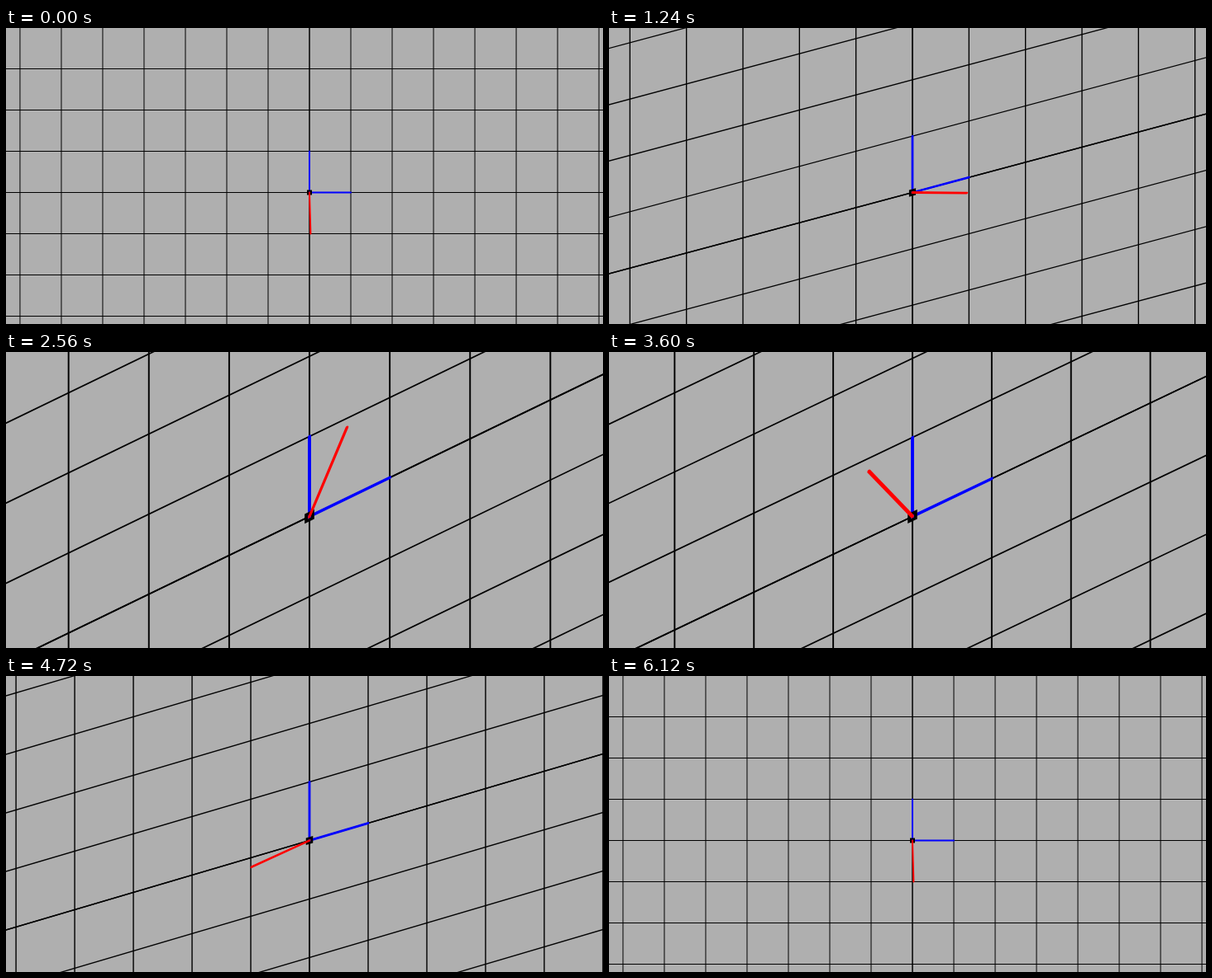
Write an HTML page with a canvas that moves like this. It is 722 by 359 pixels and loops after 6.2 s.

```html
<!DOCTYPE html>
<html lang="en">
<head>
<meta charset="utf-8">
<title>Shear and scale of a basis</title>
<style>
  html, body { margin: 0; width: 100%; height: 100%; overflow: hidden; background: #afafaf; }
  canvas { display: block; width: 722px; height: 359px; }
</style>
</head>
<body>
<canvas id="stage" width="722" height="359"></canvas>
<script>
const ctx = document.getElementById('stage').getContext('2d');
const LOOP = 6200, TURN = 6120, TICK = 40;
const START = 1.6 * Math.PI / 180;
const ORIGIN = { x: 367, y: 199.5 };
const UNIT = 50, REACH = 20;

function line(x1, y1, x2, y2) {
  ctx.beginPath();
  ctx.moveTo(x1, y1);
  ctx.lineTo(x2, y2);
  ctx.stroke();
}

function drawGrid() {
  const end = REACH * UNIT;
  ctx.strokeStyle = '#000';
  ctx.lineWidth = 1;
  ctx.lineCap = 'butt';
  for (let i = -REACH; i <= REACH; i++) {
    const p = i * UNIT;
    line(p, -end, p, end);
    line(-end, p, end, p);
  }
  // a second pass darkens the two axes
  line(0, -end, 0, end);
  line(-end, 0, end, 0);
}

function drawVector(x, y, color) {
  ctx.strokeStyle = color;
  ctx.lineWidth = 2;
  ctx.lineCap = 'round';
  line(0, 0, x * UNIT, y * UNIT);
}

function drawOrigin() {
  ctx.strokeStyle = '#000';
  ctx.lineWidth = 2;
  ctx.strokeRect(-2, -2, 4, 4);
}

function draw(time) {
  const t = Math.min(Math.floor((time % LOOP) / TICK) * TICK, TURN);
  const angle = START + 2 * Math.PI * t / TURN;
  const scale = 1.5 - 0.5 * Math.cos(angle);

  ctx.setTransform(1, 0, 0, 1, 0, 0);
  ctx.fillStyle = '#afafaf';
  ctx.fillRect(0, 0, 722, 359);

  // the matrix also shapes the stroke widths
  ctx.setTransform(scale, 1 - scale, 0, scale, ORIGIN.x, ORIGIN.y);
  drawGrid();
  drawVector(1, 0, '#00f');
  drawVector(0, -1, '#00f');
  drawOrigin();
  drawVector(Math.sin(angle), Math.cos(angle), '#f00');
}

const began = performance.now();
function tick() {
  draw(performance.now() - began);
  requestAnimationFrame(tick);
}
tick();
</script>
</body>
</html>
```
